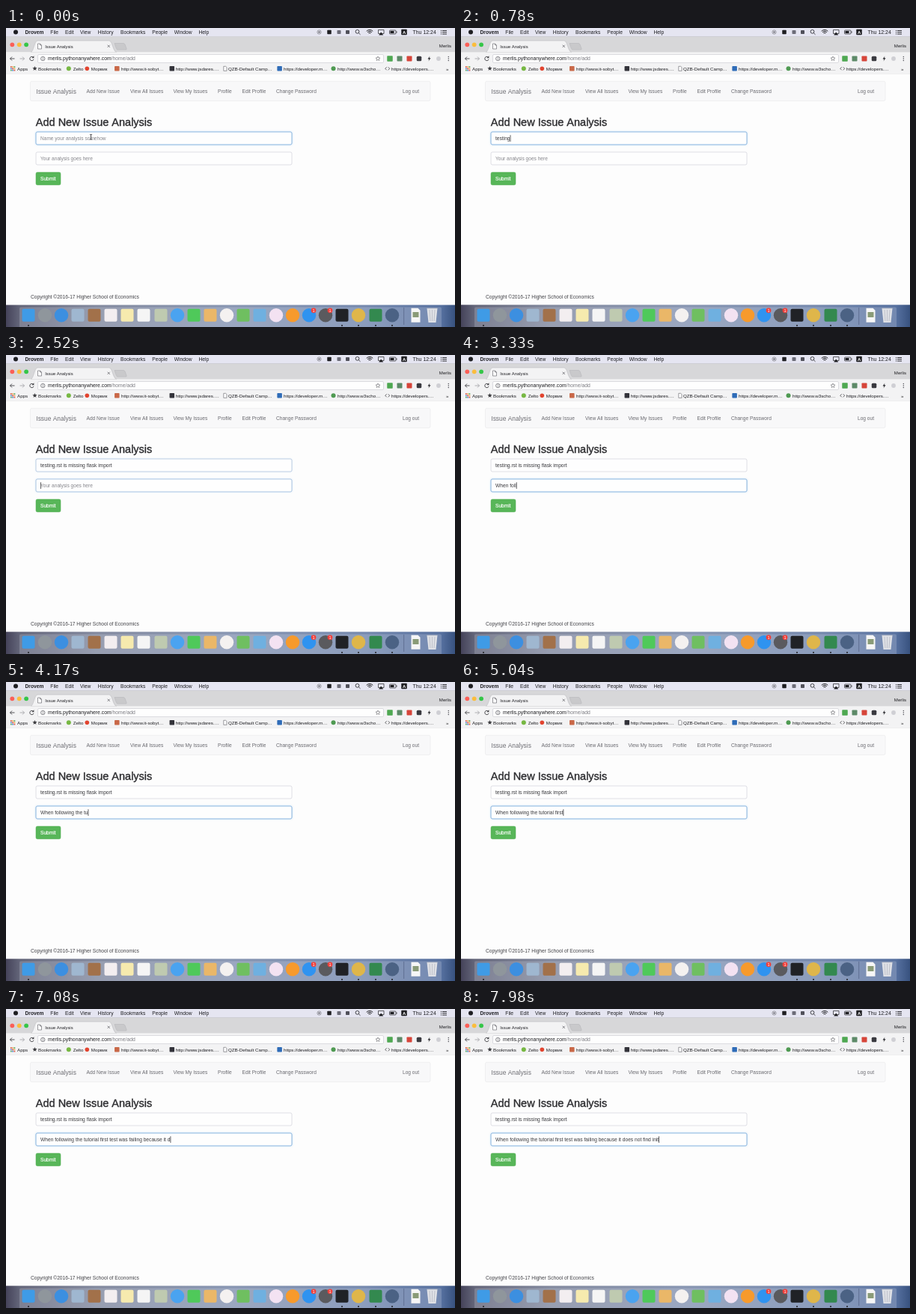
Animation of 600 by 400 pixels, one loop 8000 ms. Source, as an HTML page with a canvas:

```html
<!DOCTYPE html>
<html lang="en">
<head>
<meta charset="utf-8">
<title>Issue Analysis</title>
<style>
  html, body { margin: 0; width: 100%; height: 100%; overflow: hidden; background: #fdfdfd; }
  canvas { display: block; width: 600px; height: 400px; }
</style>
</head>
<body>
<canvas id="stage"></canvas>
<script>
const canvas = document.getElementById('stage');
const ctx = canvas.getContext('2d');
const ratio = window.devicePixelRatio || 1;
canvas.width = 600 * ratio;
canvas.height = 400 * ratio;

const LOOP = 8000;
const FOCUS_SWITCH = 2430;
const FONT = '"Liberation Sans", Arial, sans-serif';
const INK = '#1e1e22';
const FIELD_SIZE = 6.65;

// Typed characters over time: [ms, count]
const title = {
  top: 139, text: 'testing.rst is missing flask import', hint: 'Name your analysis somehow',
  keys: [[380, 0], [1600, 22], [2340, 35]]
};
const body = {
  top: 166, text: 'When following the tutorial first test was failing because it does not find init',
  hint: 'Your analysis goes here',
  keys: [[2700, 0], [4150, 21], [5950, 46], [7060, 63], [7960, 80]]
};

function typedCount(keys, t) {
  if (t <= keys[0][0]) return 0;
  for (let i = 1; i < keys.length; i++) {
    const [t0, n0] = keys[i - 1], [t1, n1] = keys[i];
    if (t < t1) return Math.floor(n0 + (n1 - n0) * (t - t0) / (t1 - t0));
  }
  return keys[keys.length - 1][1];
}

function rect(x, y, w, h, fill, radius = 0) {
  ctx.beginPath();
  ctx.roundRect(x, y, w, h, radius);
  ctx.fillStyle = fill;
  ctx.fill();
}

function frame(x, y, w, h, color, radius = 0, width = 0.7) {
  ctx.beginPath();
  ctx.roundRect(x, y, w, h, radius);
  ctx.strokeStyle = color;
  ctx.lineWidth = width;
  ctx.stroke();
}

function disc(x, y, r, fill) {
  ctx.beginPath();
  ctx.arc(x, y, r, 0, Math.PI * 2);
  ctx.fillStyle = fill;
  ctx.fill();
}

function square(x, y, size, fill, radius = 0.8) {
  rect(x - size / 2, y - size / 2, size, size, fill, radius);
}

function arc(x, y, r, from, to, color = INK, width = 0.8) {
  ctx.beginPath();
  ctx.arc(x, y, r, from * Math.PI, to * Math.PI);
  ctx.strokeStyle = color;
  ctx.lineWidth = width;
  ctx.stroke();
}

function path(d, x, y, { fill, stroke, width = 0.8 }) {
  const shape = new Path2D(d);
  ctx.save();
  ctx.translate(x, y);
  if (fill) { ctx.fillStyle = fill; ctx.fill(shape); }
  if (stroke) { ctx.strokeStyle = stroke; ctx.lineWidth = width; ctx.stroke(shape); }
  ctx.restore();
}

function label(text, x, y, size, color = INK, weight = '') {
  ctx.font = `${weight} ${size}px ${FONT}`;
  ctx.fillStyle = color;
  ctx.fillText(text, x, y);
  return x + ctx.measureText(text).width;
}

// A weight between regular and bold
function mediumLabel(text, x, y, size, color, extra) {
  label(text, x, y, size, color);
  ctx.strokeStyle = color;
  ctx.lineWidth = extra;
  ctx.strokeText(text, x, y);
}

function labels(items, y, size, color) {
  for (const [text, x] of items) label(text, x, y, size, color);
}

function star(x, y, r, fill, stroke) {
  let d = '';
  for (let i = 0; i < 10; i++) {
    const a = i * Math.PI / 5 - Math.PI / 2, k = i % 2 ? r * 0.45 : r;
    d += `${i ? 'L' : 'M'}${k * Math.cos(a)} ${k * Math.sin(a)}`;
  }
  path(d + 'Z', x, y, { fill, stroke, width: 0.6 });
}

function drawMenuBar() {
  rect(0, 0, 600, 11.5, '#e5e5f1');
  disc(13, 5.5, 3, INK);
  label('Drovem', 25.5, 8, 6.7, INK, 'bold');
  labels([['File', 59.3], ['Edit', 79], ['View', 99], ['History', 122.7], ['Bookmarks', 153],
    ['People', 195.2], ['Window', 224.7], ['Help', 257.5]], 8, 6.7);
  label('Thu 12:24', 543.5, 8, 6.95);

  arc(418.5, 5.5, 2.6, 0, 2, '#77777f', 0.7);
  disc(418.5, 5.5, 1.3, '#77777f');
  square(432, 5.5, 5.5, INK);
  square(445, 5.5, 5, '#6c6c78');
  square(456.5, 5.5, 5, '#50505a');
  arc(469.5, 4.8, 2.4, 0, 2);
  path('M1.7 1.7L4 4', 469.5, 4.8, { stroke: INK });
  for (const r of [2, 4, 6]) arc(486, 8.5, r, 1.25, 1.75, INK, 1);
  frame(497.5, 2.5, 7.5, 5, INK);
  path('M0-3L3 1H-3Z', 501.2, 8.5, { fill: INK });
  frame(512.5, 3, 8.5, 5, INK, 1);
  rect(513.5, 4, 5, 3, INK);
  rect(521.6, 4.6, 0.8, 1.8, INK);
  square(532, 5.5, 7.5, INK);
  label('A', 529.9, 7.7, 6, '#fff', 'bold');
  for (let i = 0; i < 3; i++) {
    rect(581, 3 + i * 2.3, 1, 0.9, INK);
    rect(583, 3 + i * 2.3, 6, 0.9, INK);
  }
}

function drawTabs() {
  rect(0, 11.5, 600, 21, '#d7d7d9');
  rect(0, 11.2, 600, 0.5, '#c4c4ca');
  disc(8.3, 22.3, 2.9, '#fb5f56');
  disc(17.7, 22.3, 2.9, '#fbbd3b');
  disc(27.1, 22.3, 2.9, '#35c648');
  path('M33 32.5C37 32 38 17 42 17H138C142 17 143 32 148 32.5Z', 0, 0,
    { fill: '#f3f3f4', stroke: '#b5b5b9', width: 0.5 });
  path('M145 20.5H157Q158.5 20.5 159 22L161 27.5Q161.5 29 160 29H149.5Q148 29 147.5 27.5Z', 0, 0,
    { fill: '#c9c9cb', stroke: '#b0b0b4', width: 0.5 });
  path('M0 0H3L5 2V7H0ZM3 0V2H5', 42.5, 21, { fill: '#fff', stroke: '#5a5a60', width: 0.6 });
  label('Issue Analysis', 52.2, 26.5, 5.85);
  path('M-1.6-1.6L1.6 1.6M1.6-1.6L-1.6 1.6', 137.3, 24.3, { stroke: '#505056', width: 0.7 });
  label('Merlis', 578.8, 25.6, 6.1);
}

function drawToolbar() {
  rect(0, 32.5, 600, 29, '#f3f3f4');
  const arrow = 'M-3 0H3M-3 0L-.5-2.5M-3 0L-.5 2.5';
  path(arrow, 8.5, 41, { stroke: '#404044', width: 0.9 });
  ctx.save();
  ctx.translate(21.5, 41);
  ctx.scale(-1, 1);
  path(arrow, 0, 0, { stroke: '#a5a5aa', width: 0.9 });
  ctx.restore();
  arc(34.5, 41, 2.7, 0.1, 1.75, '#404044', 0.9);
  path('M0 0V-3L-3 0Z', 37.4, 40.3, { fill: '#404044' });

  rect(42.5, 35.5, 462, 11, '#fefefe', 1.5);
  frame(42.5, 35.5, 462, 11, '#c8c8ce', 1.5, 0.6);
  arc(49.3, 41, 2.7, 0, 2, '#505056', 0.7);
  rect(48.95, 40.6, 0.7, 2, '#505056');
  rect(48.95, 39.2, 0.7, 0.8, '#505056');
  const end = label('merlis.pythonanywhere.com', 56, 43.3, 6.8);
  label('/home/add', end, 43.3, 6.8, '#7c7c82');
  star(497, 41, 3.1, null, '#606066');

  square(513, 41, 7.5, '#4ea851');
  square(526, 41, 7, '#5d8a68');
  square(539, 41, 7, '#d6453a');
  square(552, 41, 6.5, '#3a3a40', 1.5);
  path('M1-3.5L-2 .6H0L-1 3.5L2-.8H0Z', 565.5, 41, { fill: INK });
  disc(578, 41, 2.9, '#cfcfd4');
  for (const dy of [-2.6, 0, 2.6]) disc(591.3, 41 + dy, 0.75, '#505056');
}

function drawBookmarks() {
  const dots = ['#dc4b3c', '#e9a23b', '#4fa75a', '#4a86d0'];
  for (let i = 0; i < 9; i++) {
    square(6.8 + i % 3 * 2.3, 52 + Math.floor(i / 3) * 2.3, 1.7, dots[i % 4], 0);
  }
  star(38.5, 54.2, 3.3, '#404044');
  disc(83.8, 54.3, 3, '#77b843');
  disc(108.3, 54.3, 2.8, '#e2442f');
  square(148.3, 54.3, 6.5, '#c96848');
  square(221.8, 54.3, 6.5, '#33333a');
  path('M-2-3H.8L2.2-1.6V3H-2Z', 292.8, 54.3, { fill: '#fff', stroke: '#5a5a60', width: 0.6 });
  square(365.6, 54.3, 6.5, '#2f6cb8');
  disc(437.5, 54.3, 3, '#4f9a52');
  path('M-1-2L-3 0L-1 2M1-2L3 0L1 2', 509.7, 54.3, { stroke: '#404044' });
  labels([['Apps', 15], ['Bookmarks', 43], ['Zelto', 89.7], ['Морвик', 113.8],
    ['http://www.it-sobyt…', 154], ['http://www.jsdares.…', 226.7], ['QZB-Default Camp…', 297],
    ['https://developer.m…', 371], ['http://www.w3scho…', 443], ['https://developers.…', 515],
    ['»', 588]], 56.5, 6.2);
  rect(0, 61, 600, 0.6, '#cfcfd3');
}

function drawPage() {
  rect(0, 61.5, 600, 309, '#fdfdfd');
  rect(32.5, 71.2, 534.5, 26.3, '#f8f8f9', 2);
  frame(32.5, 71.2, 534.5, 26.3, '#e7e7ea', 2, 0.6);
  label('Issue Analysis', 40.3, 87.6, 8.4, '#6e6e74');
  labels([['Add New Issue', 107.5], ['View All Issues', 166], ['View My Issues', 223.5],
    ['Profile', 283], ['Edit Profile', 315.5], ['Change Password', 361], ['Log out', 530]],
    87.1, 6.6, '#6a6a70');
  mediumLabel('Add New Issue Analysis', 39.8, 131, 14.5, '#2b2b2e', 0.35);
  rect(40, 193, 33, 17, '#58b659', 2);
  frame(40, 193, 33, 17, '#4dab4e', 2, 0.5);
  mediumLabel('Submit', 46, 204, 6.6, '#fff', 0.15);
  label('Copyright ©2016-17 Higher School of Economics', 33, 362.2, 6.65, '#434348');
}

function drawField(field, t, focus, active) {
  const { top } = field, baseline = top + 10.9;
  ctx.save();
  ctx.shadowColor = `rgba(102, 175, 233, ${0.55 * focus})`;
  ctx.shadowBlur = 3 * ratio;
  rect(40, top, 342, 17, '#fefefe', 2);
  ctx.restore();
  frame(40, top, 342, 17, '#d2d2da', 2, 0.7);
  ctx.globalAlpha = focus;
  frame(40, top, 342, 17, '#84b9ea', 2, 0.8);
  ctx.globalAlpha = 1;

  const count = typedCount(field.keys, t);
  const typed = field.text.slice(0, count);
  let end = 46;
  if (count) end = label(typed, 46, baseline, FIELD_SIZE, '#38383c');
  else label(field.hint, 46, baseline, 6.57, '#85858b');
  if (active && t > 300) rect(end + 0.1, top + 4.3, 0.7, 8.6, INK);

  if (active && field === title && count > 11) {
    ctx.setLineDash([1, 0.7]);
    path('M0 0H28.8', 46, baseline + 1.6, { stroke: '#e0402f', width: 0.9 });
    ctx.setLineDash([]);
  }
}

function drawDock() {
  const shelf = ctx.createLinearGradient(0, 0, 600, 0);
  [['#45435a', 0], ['#636579', 0.03], ['#838a9f', 0.2], ['#8896b2', 0.5], ['#7589ae', 0.8],
    ['#56709f', 0.97], ['#38527f', 1]].forEach(([color, at]) => shelf.addColorStop(at, color));
  rect(0, 370.5, 600, 29.5, shelf);
  rect(18, 373.5, 564, 26.5, 'rgba(230, 233, 245, .2)', [2, 2, 0, 0]);

  // Round icons carry a third entry
  const icons = [['#3f9be6', 30], ['#8f969c', 52, 1], ['#3c8fe0', 74, 1], ['#9fb7d0', 96],
    ['#a2714a', 118], ['#f3eef0', 140], ['#f6eaae', 162], ['#f5f5f5', 184], ['#bfcab0', 207],
    ['#4aa3f0', 229, 1], ['#4fc95a', 251], ['#eab768', 273], ['#f4f1f0', 295, 1],
    ['#6fbf60', 317], ['#6fb0e0', 339], ['#f3e2f2', 361, 1], ['#f79a2c', 383, 1],
    ['#2f93f0', 405, 1], ['#5a5a5e', 427, 1], ['#202226', 449], ['#dfb64a', 471, 1],
    ['#33894f', 494], ['#4b6284', 516, 1]];
  for (const [color, x, round] of icons) {
    if (round) disc(x, 384.3, 9.2, color);
    else square(x, 384.3, 17, color, 2);
  }
  for (const x of [411, 433]) {
    disc(x, 377.8, 3.4, '#f0413c');
    label('1', x - 1.6, 379.9, 5.5, '#fff');
  }

  rect(531.5, 374, 0.6, 23, '#4a587a');
  path('M-6-9.5H3L6-6.5V9.5H-6Z', 547.5, 384.3, { fill: '#f6f6f6' });
  rect(543.5, 380, 8, 7, '#8a9b78');
  path('M-7-9H7L5 10H-5Z', 569.5, 384, { fill: '#dfe1e6' });
  path('M-3.5-7L-2.5 8M0-7V8M3.5-7L2.5 8M-7-9H7', 569.5, 384, { stroke: '#b0b4be', width: 0.7 });
  for (const x of [30, 449, 471, 494, 516]) disc(x, 398, 1, INK);
}

function draw(now) {
  const t = now % LOOP;
  const onBody = t >= FOCUS_SWITCH;
  const shift = Math.min(1, Math.max(0, (t - FOCUS_SWITCH) / 150));
  ctx.setTransform(ratio, 0, 0, ratio, 0, 0);
  drawMenuBar();
  drawTabs();
  drawToolbar();
  drawBookmarks();
  drawPage();
  drawField(title, t, 1 - shift, !onBody);
  drawField(body, t, shift, onBody);
  if (t < title.keys[0][0]) {
    path('M-1.5-3.5Q0-3.5 0-2.5Q0-3.5 1.5-3.5M0-2.5V2.5M-1.5 3.5Q0 3.5 0 2.5Q0 3.5 1.5 3.5',
      113.5, 145.8, { stroke: INK });
  }
  drawDock();
  requestAnimationFrame(draw);
}
requestAnimationFrame(draw);
</script>
</body>
</html>
```
